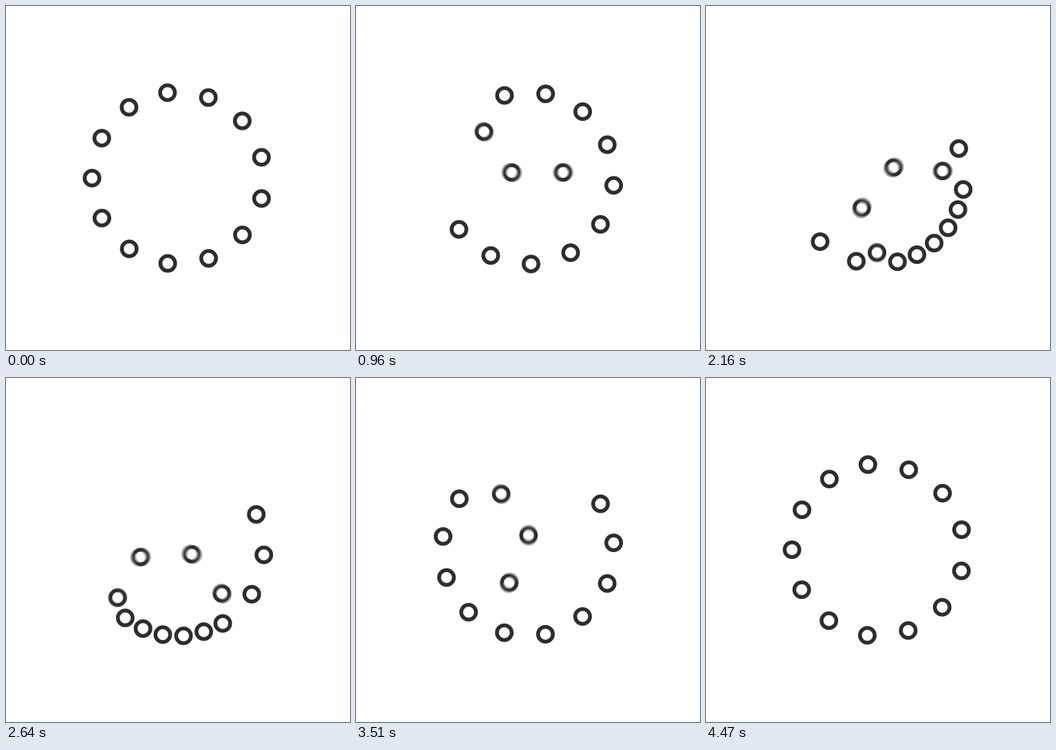
An HTML page with a canvas for the animation above (4.5 s loop, 500 px wide and 500 px high).

```html
<!DOCTYPE html>
<html lang="en">
<head>
<meta charset="utf-8">
<title>Thirteen rings</title>
<style>
html, body { margin: 0; width: 100%; height: 100%; overflow: hidden; background: #fff; }
canvas { display: block; width: 500px; height: 500px; }
</style>
</head>
<body>
<canvas id="stage" width="500" height="500"></canvas>
<script>
const ctx = document.getElementById("stage").getContext("2d");
const LOOP = 4500, STEP = 30;
const COUNT = 13, RADIUS = 125, CENTER = 250;
const RING = 10.75, WEIGHT = 5.5;
const SAMPLES = 5, SHUTTER = 0.6;
const PITCH = 2 * Math.PI / COUNT;
const SPREAD = 2.5; // start of the last crossing, in crossing lengths

const clamp = x => Math.min(1, Math.max(0, x));
const smooth = x => x * x * (3 - 2 * x);

// Each ring crosses its own diameter in turn while the whole set rotates.
function drawRings(t) {
  const progress = (SPREAD + 1) * (2 * t + smooth(t)) / 3;
  const turn = 1.5 * PITCH * t;
  for (let k = 0; k < COUNT; k++) {
    const x = clamp(progress - SPREAD * k / (COUNT - 1));
    const r = RADIUS * (1 - 2 * smooth(x));
    const angle = Math.PI - k * PITCH + turn;
    ctx.beginPath();
    ctx.arc(CENTER + r * Math.cos(angle), CENTER - r * Math.sin(angle), RING, 0, 2 * Math.PI);
    ctx.stroke();
  }
}

// Motion blur: equal samples across the open shutter, added together.
function render(ms) {
  const frame = Math.floor((ms % LOOP) / STEP);
  ctx.clearRect(0, 0, 500, 500);
  ctx.globalCompositeOperation = "lighter";
  ctx.globalAlpha = 1 / SAMPLES;
  ctx.strokeStyle = "#2d2d2d";
  ctx.lineWidth = WEIGHT;
  for (let i = 0; i < SAMPLES; i++) {
    const offset = SHUTTER * (i + 0.5) / SAMPLES;
    drawRings((frame + offset) * STEP / LOOP);
  }
}

const start = performance.now();
function tick(now) {
  render(Math.max(0, now - start));
  requestAnimationFrame(tick);
}
render(0);
requestAnimationFrame(tick);
</script>
</body>
</html>
```
